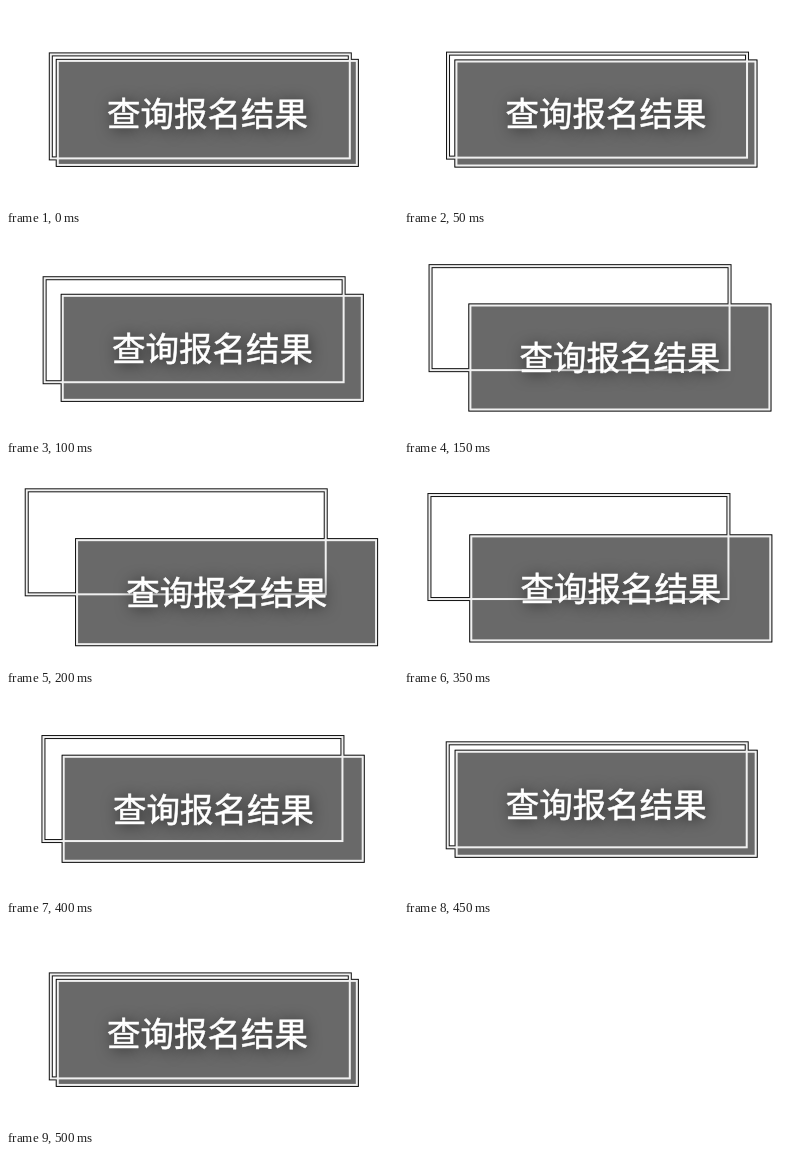
Recreate the animation shown at these times as an HTML page with a canvas. Size 392 by 202 pixels, loop 0.75 s.

```html
<!DOCTYPE html>
<html lang="zh-CN">
<head>
<meta charset="utf-8">
<style>
  html, body { margin: 0; width: 100%; height: 100%; overflow: hidden; background: #fff; }
  canvas { display: block; }
</style>
</head>
<body>
<canvas id="stage" width="392" height="202"></canvas>
<script>
const ctx = document.getElementById('stage').getContext('2d');
const LOOP = 750, STEP = 50, TURN = 253;
const WIDTH = 303, HEIGHT = 108;
const LABEL = '查询报名结果';
const LINE = '#f0f0f0', EDGE = '#101010';

const easeInOut = t => t < 0.5 ? 4 * t ** 3 : 1 - 4 * (1 - t) ** 3;

// 0 = boxes together, 1 = fully apart
function spreadAt(time) {
  const t = Math.floor((time % LOOP) / STEP) * STEP;
  return easeInOut(Math.max(0, 1 - Math.abs(t - TURN) / TURN));
}

function outline(box, inset, width, color) {
  const d = inset + width / 2;
  ctx.lineWidth = width;
  ctx.strokeStyle = color;
  ctx.strokeRect(box.x + d, box.y + d, WIDTH - 2 * d, HEIGHT - 2 * d);
}

function drawLabel(box) {
  const x = box.x + WIDTH / 2 + 0.2, y = box.y + 66.8;
  ctx.font = '33.5px "Noto Sans CJK SC", "Noto Sans CJK", sans-serif';
  ctx.textAlign = 'center';
  ctx.fillStyle = ctx.strokeStyle = '#fff';

  ctx.save();
  ctx.shadowColor = 'rgba(0, 0, 0, 0.75)';
  ctx.shadowBlur = 15;
  ctx.shadowOffsetX = 1;
  ctx.shadowOffsetY = 2;
  ctx.fillText(LABEL, x, y);
  ctx.restore();

  ctx.lineWidth = 0.6;
  ctx.strokeText(LABEL, x, y);
}

function draw(time) {
  const spread = spreadAt(time);
  const frame = { x: 42.8 - 25 * spread, y: 46.4 - 25 * spread };
  const panel = { x: 49.8 + 20 * spread, y: 52.9 + 20 * spread };

  ctx.fillStyle = '#fff';
  ctx.fillRect(0, 0, 392, 202);

  outline(frame, 0, 4, EDGE);
  ctx.fillStyle = '#696969';
  ctx.fillRect(panel.x, panel.y, WIDTH, HEIGHT);
  outline(panel, 0, 1, EDGE);
  outline(panel, 1, 2, LINE);
  outline(frame, 1, 2, LINE);
  drawLabel(panel);
}

const start = performance.now();
function tick() {
  draw(performance.now() - start);
  requestAnimationFrame(tick);
}
tick();
</script>
</body>
</html>
```
